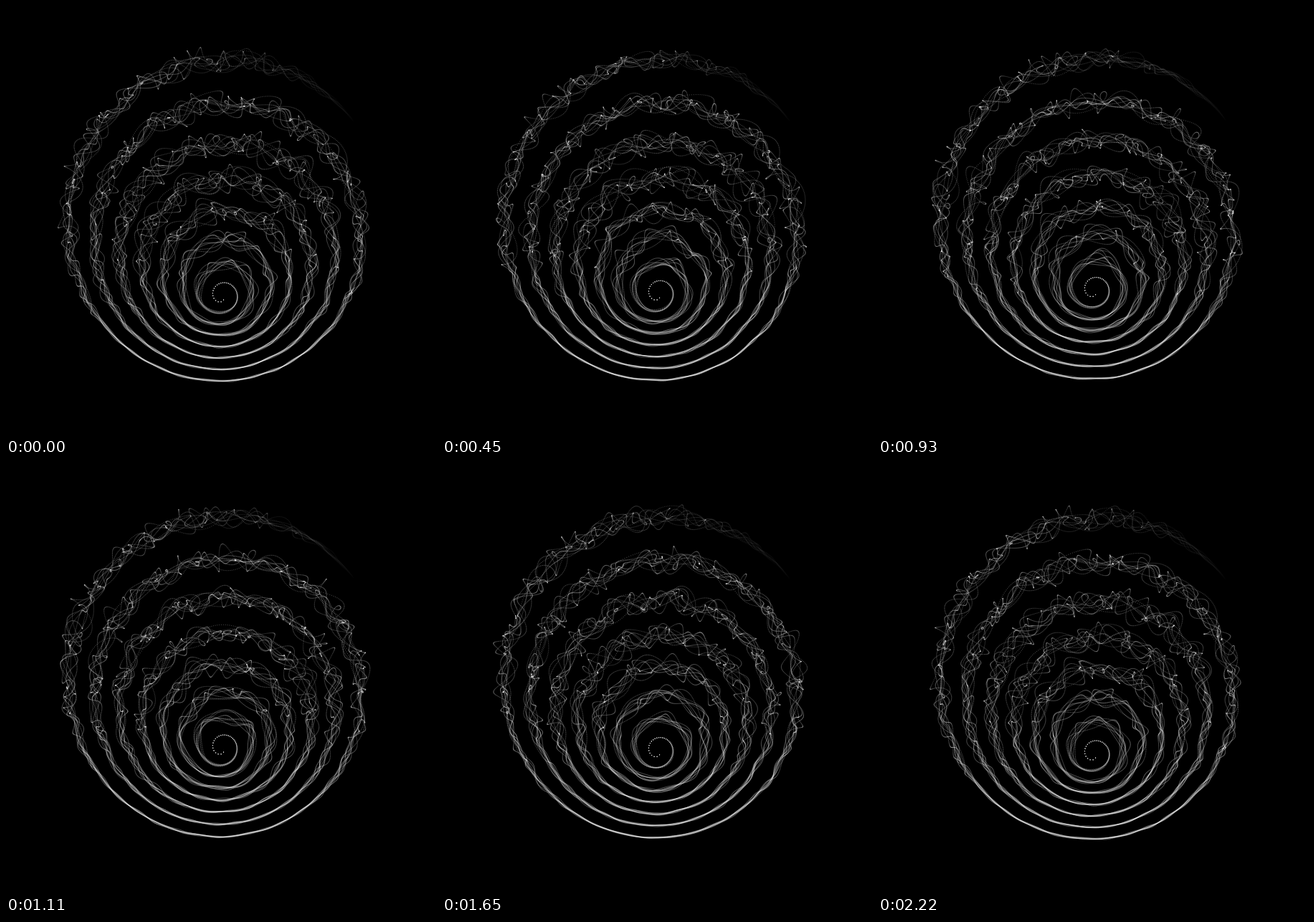
Recreate the animation shown at these times as an HTML page with a canvas. Size 600x600 px, loop 2250 ms.

```html
<!DOCTYPE html>
<html lang="en">
<head>
<meta charset="utf-8">
<title>Noise spiral</title>
<style>
  html, body { margin: 0; width: 100%; height: 100%; overflow: hidden; background: #000; }
  canvas { display: block; width: 600px; height: 600px; }
</style>
</head>
<body>
<canvas id="stage" width="600" height="600"></canvas>
<script>
const SIZE = 600, LOOP = 2250, STEP = 30, TAU = Math.PI * 2;
const FIRST = -0.1, TURNS = 7.65, STRANDS = 9, WAVES = 4, DRIFT = 370, WEIGHT = 0.31;

const ctx = document.getElementById('stage').getContext('2d');
const image = ctx.createImageData(SIZE, SIZE);
const pixels = new Uint32Array(image.data.buffer);
const light = new Float32Array(SIZE * SIZE);

let seed = 20177;
function rand() {
  seed = (seed * 1664525 + 1013904223) % 4294967296;
  return seed / 4294967296;
}
const smooth = v => {
  v = Math.min(1, Math.max(0, v));
  return v * v * (3 - 2 * v);
};

// Spiral running clockwise from its low core; n counts the turns.
const radius = n => 7 + 18.5 * n + 1.38 * n * n;

function buildSpiral() {
  const points = [];
  let n = FIRST, s = 0;
  while (n < TURNS) {
    const r = radius(n), a = n * TAU;
    const y = 405 - 3.5 * n - 1.35 * n * n + 1.02 * r * Math.cos(a);
    const end = TURNS - n;
    points.push({
      x: 300 - r * Math.sin(a),
      y, s,
      sway: 4 - 0.05 * n * n,
      amp: (1.6 + 16.4 * smooth((505 - y) / 265)) / 3.2
        * smooth((n - 0.5) / 1.1) * smooth((end + 0.02) / 0.2),
      glow: WEIGHT * Math.min(1, end / 0.22)
    });
    const ds = 0.9 + 2.2 * Math.exp(-1.6 * n * n) + 0.4 * Math.exp(-n / 1.5)
      + 0.6 * smooth((n - 7.45) / 0.2);
    // Waves are longer near the core.
    s += ds * (0.45 + 0.55 * smooth(n / 5));
    n += ds / (TAU * r);
  }
  return points;
}

// Travelling waves with whole cycles per loop, so the motion closes.
function buildWaves() {
  return Array.from({ length: WAVES }, () => {
    const length = 39 + 52 * rand();
    return { k: TAU / length, cycles: Math.round(DRIFT / length), phase: TAU * rand() };
  });
}

const spiral = buildSpiral();
const strands = Array.from({ length: STRANDS }, () => ({ x: buildWaves(), y: buildWaves() }));

function offset(waves, s, t) {
  let sum = 0;
  for (const w of waves) sum += Math.sin(w.k * s - TAU * w.cycles * t + w.phase);
  return sum;
}

function splat(x, y, v) {
  const ix = Math.floor(x), iy = Math.floor(y), fx = x - ix, fy = y - iy;
  const i = iy * SIZE + ix;
  light[i] += v * (1 - fx) * (1 - fy);
  light[i + 1] += v * fx * (1 - fy);
  light[i + SIZE] += v * (1 - fx) * fy;
  light[i + SIZE + 1] += v * fx * fy;
}

function draw(t) {
  light.fill(0);
  const lift = Math.cos(TAU * t) - 1;
  for (const strand of strands) {
    for (const p of spiral) {
      let x = p.x, y = p.y + p.sway * lift;
      if (p.amp > 0) {
        x += p.amp * offset(strand.x, p.s, t);
        y += p.amp * offset(strand.y, p.s, t);
      }
      splat(x, y, p.glow);
    }
  }
  for (let i = 0; i < light.length; i++) {
    const v = light[i] ? Math.round(255 * (1 - Math.exp(-light[i]))) : 0;
    pixels[i] = 0xff000000 | v << 16 | v << 8 | v;
  }
  ctx.putImageData(image, 0, 0);
}

const start = performance.now();
let shown = -1;
function tick() {
  const elapsed = Math.max(0, performance.now() - start) % LOOP;
  const step = Math.floor(elapsed / STEP);
  if (step !== shown) {
    shown = step;
    draw(step * STEP / LOOP);
  }
  requestAnimationFrame(tick);
}
tick();
</script>
</body>
</html>
```
